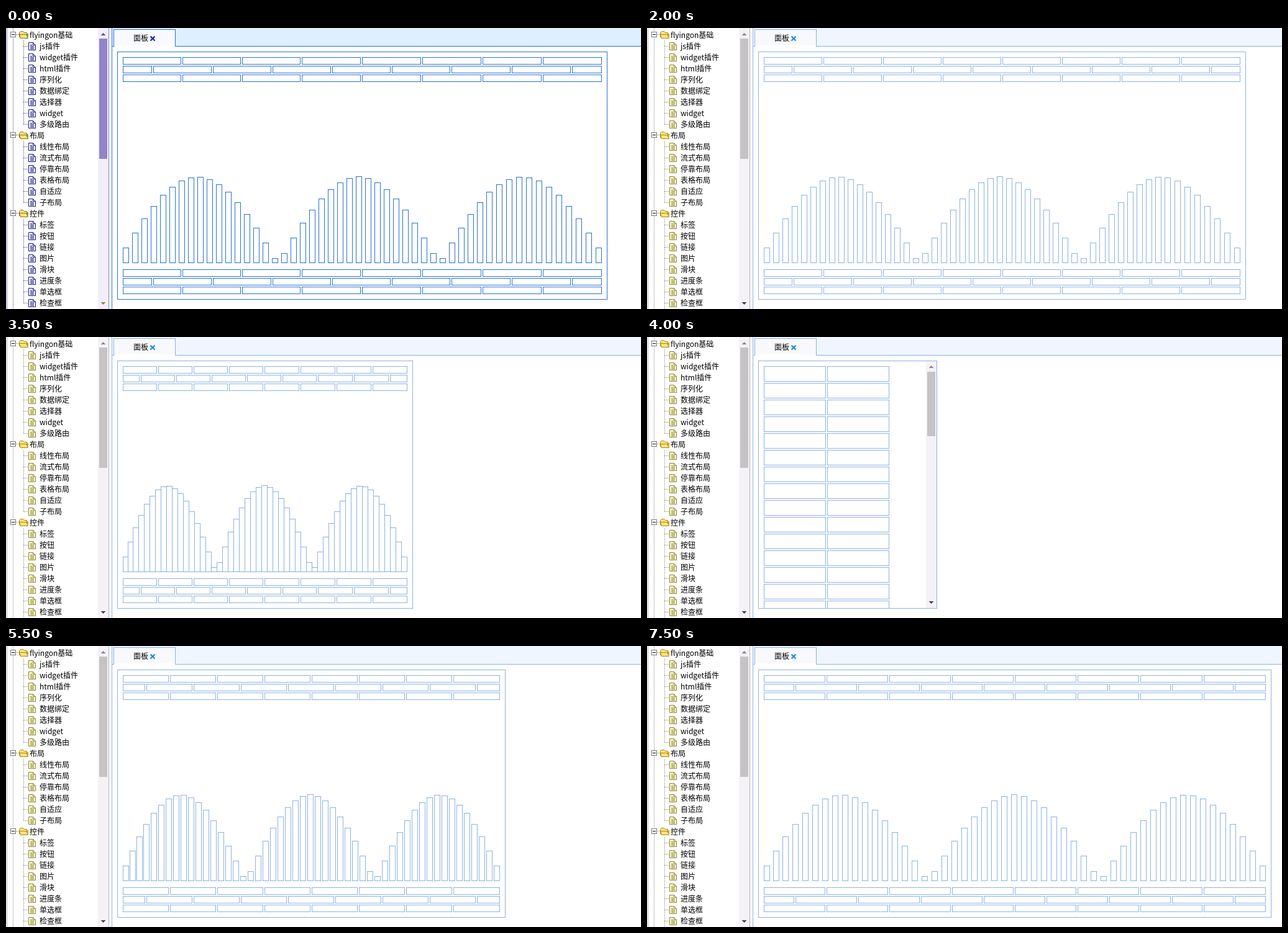
These frames come from a looping animation (1022 px wide and 453 px high, 8000 ms). An HTML page with a canvas:

```html
<!DOCTYPE html>
<html lang="zh">
<head>
<meta charset="utf-8">
<title>面板</title>
<style>
  html, body { margin: 0; width: 100%; height: 100%; overflow: hidden; background: #fff; }
  canvas { display: block; }
</style>
</head>
<body>
<canvas id="stage" width="1022" height="453"></canvas>
<script>
const ctx = document.getElementById('stage').getContext('2d');
const LOOP = 8000;

// [start time, right edge of the panel]
const WIDTHS = [
  [0, 968], [1500, 966], [2000, 964], [3000, 885], [3500, 655], [4000, 467],
  [4500, 305], [5000, 590], [5500, 804], [6000, 954], [6500, 964], [7500, 1005]
];
const VIVID = {
  line: '#2a72d4', header: '#deefff', tab: '#f8faff', close: '#0d1cae', side: '#8d80c6',
  track: '#f3edf9', thumb: '#9184c8', up: '#5b4fae', down: '#8f8b3c', dots: '#555',
  docLine: '#17177c', docFill: '#f4f4fb', folderLine: '#8a7411', folder: '#ffe184', folderEdge: '#62b935'
};
const SOFT = {
  line: '#8db2e3', header: '#eff6ff', tab: '#f8f9fd', close: '#1888d6', side: '#b5b3b8',
  track: '#f5f2f7', thumb: '#c5c3c6', up: '#8c8a8c', down: '#454345', dots: '#8c8c8c',
  docLine: '#85843f', docFill: '#fffbc4', folderLine: '#a98618', folder: '#ffe47a', folderEdge: '#d7ac29'
};
const TREE = [
  ['flyingon基础', 'js插件', 'widget插件', 'html插件', '序列化', '数据绑定', '选择器', 'widget', '多级路由'],
  ['布局', '线性布局', '流式布局', '停靠布局', '表格布局', '自适应', '子布局'],
  ['控件', '标签', '按钮', '链接', '图片', '滑块', '进度条', '单选框', '检查框']
];
const LEFT = 188, TOP = 47, BARS = 51, CELLS = BARS + 50;
let theme;

function fill(x, y, w, h, color) {
  ctx.fillStyle = color;
  ctx.fillRect(x, y, w, h);
}

function box(x, y, w, h, line = theme.line, inside = '#fff') {
  fill(x, y, w, h, line);
  fill(x + 1, y + 1, w - 2, h - 2, inside);
}

function poly(points, color, stroke) {
  ctx.beginPath();
  points.forEach(([x, y]) => ctx.lineTo(x, y));
  ctx.closePath();
  ctx.fillStyle = color;
  ctx.fill();
  if (stroke) {
    ctx.strokeStyle = stroke;
    ctx.lineWidth = 1;
    ctx.stroke();
  }
}

function text(value, x, y) {
  ctx.font = '12px "Noto Sans CJK SC", "Noto Sans CJK", "Noto Sans CJK JP", sans-serif';
  ctx.fillStyle = '#000';
  ctx.fillText(value, x, y);
}

function dotsAcross(x, y, end) {
  for (; x < end; x += 2) fill(x, y, 1, 1, theme.dots);
}

function dotsDown(x, y, end) {
  for (; y < end; y += 2) fill(x, y, 1, 1, theme.dots);
}

function arrow(x, y, dir, color) {
  for (let i = 0; i < 4; i++) fill(x - i, y + dir * i, 2 * i + 1, 1, color);
}

function folderIcon(x, y) {
  poly([[x + .5, y + 9.5], [x + .5, y + 2.5], [x + 2.5, y + .5], [x + 6.5, y + .5],
    [x + 8.5, y + 2.5], [x + 12.5, y + 2.5], [x + 12.5, y + 10.5], [x + 2.5, y + 10.5]],
    theme.folder, theme.folderLine);
  poly([[x + 2.5, y + 11.5], [x + .5, y + 5.5], [x + 11.5, y + 5.5], [x + 14.5, y + 11.5]],
    theme.folder, theme.folderLine);
  fill(x + 13, y + 4, 2, 6, theme.folderEdge);
}

function docIcon(x, y) {
  poly([[x + .5, y + .5], [x + 7.5, y + .5], [x + 11.5, y + 4.5], [x + 11.5, y + 12.5], [x + .5, y + 12.5]],
    theme.docFill, theme.docLine);
  fill(x + 7, y + 1, 1, 4, theme.docLine);
  fill(x + 7, y + 4, 4, 1, theme.docLine);
  fill(x + 3, y + 4, 3, 1, theme.docLine);
  fill(x + 3, y + 6, 6, 1, theme.docLine);
  fill(x + 3, y + 8, 6, 1, theme.docLine);
  fill(x + 3, y + 10, 6, 1, theme.docLine);
}

function expander(x, y) {
  box(x, y, 9, 9, '#75757c');
  fill(x + 2, y + 4, 5, 1, '#000');
}

function drawSidebar() {
  fill(1, 0, 1, 453, theme.side);
  dotsDown(11, 0, 453);
  let row = 0;
  for (const [title, ...items] of TREE) {
    const y = 18 * row++;
    dotsAcross(16, y + 10, 21);
    expander(7, y + 6);
    folderIcon(21, y + 5);
    text(title, 38, y + 16);
    dotsDown(28, y + 20, Math.min(453, y + 18 * items.length + 12));
    for (const item of items) {
      const top = 18 * row++;
      dotsAcross(28, top + 11, 36);
      docIcon(36, top + 5);
      text(item, 54, top + 16);
    }
  }
  if (theme === SOFT) dotsDown(28, 444, 453);
  fill(148, 0, 17, 453, theme.track);
  arrow(156, 8, 1, theme.up);
  fill(150, 17, 13, 194, theme.thumb);
  arrow(156, 445, -1, theme.down);
  fill(165, 0, 1, 453, theme.side);
}

function drawTabs() {
  fill(170, 0, 852, 30, theme.header);
  fill(170, 29, 852, 1, theme.line);
  fill(170, 0, 1, 453, theme.line);
  box(173, 2, 100, 28, theme.line, theme.tab);
  fill(174, 28, 98, 2, '#fff');
  text('面板', 205, 21);
  ctx.strokeStyle = theme.close;
  ctx.lineWidth = 2;
  ctx.beginPath();
  ctx.moveTo(232.5, 13.5); ctx.lineTo(239.5, 20.5);
  ctx.moveTo(239.5, 13.5); ctx.lineTo(232.5, 20.5);
  ctx.stroke();
}

// Shares whole pixels by weight; the remainder drifts to the end.
function share(total, weights) {
  let units = weights.reduce((a, b) => a + b, 0);
  return weights.map(weight => {
    const size = Math.floor(total / units * weight + 1e-9);
    total -= size;
    units -= weight;
    return size;
  });
}

function drawRow(y, width, weights) {
  let x = LEFT;
  for (const w of share(width - 2 * (weights.length - 1), weights)) {
    box(x, y, w, 12);
    x += w + 2;
  }
}

function drawTable(right) {
  const width = right - 9 - LEFT;
  const even = Array(8).fill(1);
  const staggered = [.5, ...Array(7).fill(1), .5];
  for (const y of [TOP, 389]) {
    drawRow(y, width, even);
    drawRow(y + 14, width, staggered);
    drawRow(y + 28, width, even);
  }
  const gaps = share(width - BARS * 10, Array(BARS - 1).fill(1));
  let x = LEFT;
  for (let i = 0; i < BARS; i++) {
    const h = Math.floor(140 * Math.abs(Math.sin((i + 1) * 3 * Math.PI / 52)));
    box(x, 379 - h, 10, h);
    x += 10 + gaps[i];
  }
}

function drawFlow(right) {
  const columns = Math.max(1, Math.floor((right - 26 - LEFT + 2) / 102));
  for (let i = 0; i < CELLS; i++) {
    const y = TOP + 27 * Math.floor(i / columns);
    if (y > 437) break;
    box(LEFT + 102 * (i % columns), y, 100, 25);
  }
  const content = Math.ceil(CELLS / columns) * 27 + 14;
  fill(right - 18, 39, 17, 398, theme.track);
  arrow(right - 10, 46, 1, theme.up);
  fill(right - 16, 56, 13, Math.round(364 * 398 / content), theme.thumb);
  arrow(right - 10, 429, -1, theme.down);
}

function drawPanel(right) {
  box(179, 38, right - 179, 400);
  ctx.save();
  ctx.beginPath();
  ctx.rect(180, 39, right - 181, 398);
  ctx.clip();
  (right < 600 ? drawFlow : drawTable)(right);
  ctx.restore();
}

function render(now) {
  const t = now % LOOP;
  theme = t < 1500 ? VIVID : SOFT;
  fill(0, 0, 1022, 453, '#fff');
  drawSidebar();
  drawTabs();
  drawPanel(WIDTHS.filter(([start]) => start <= t).pop()[1]);
}

const begin = performance.now();
function tick() {
  render(performance.now() - begin);
  requestAnimationFrame(tick);
}
tick();
</script>
</body>
</html>
```
